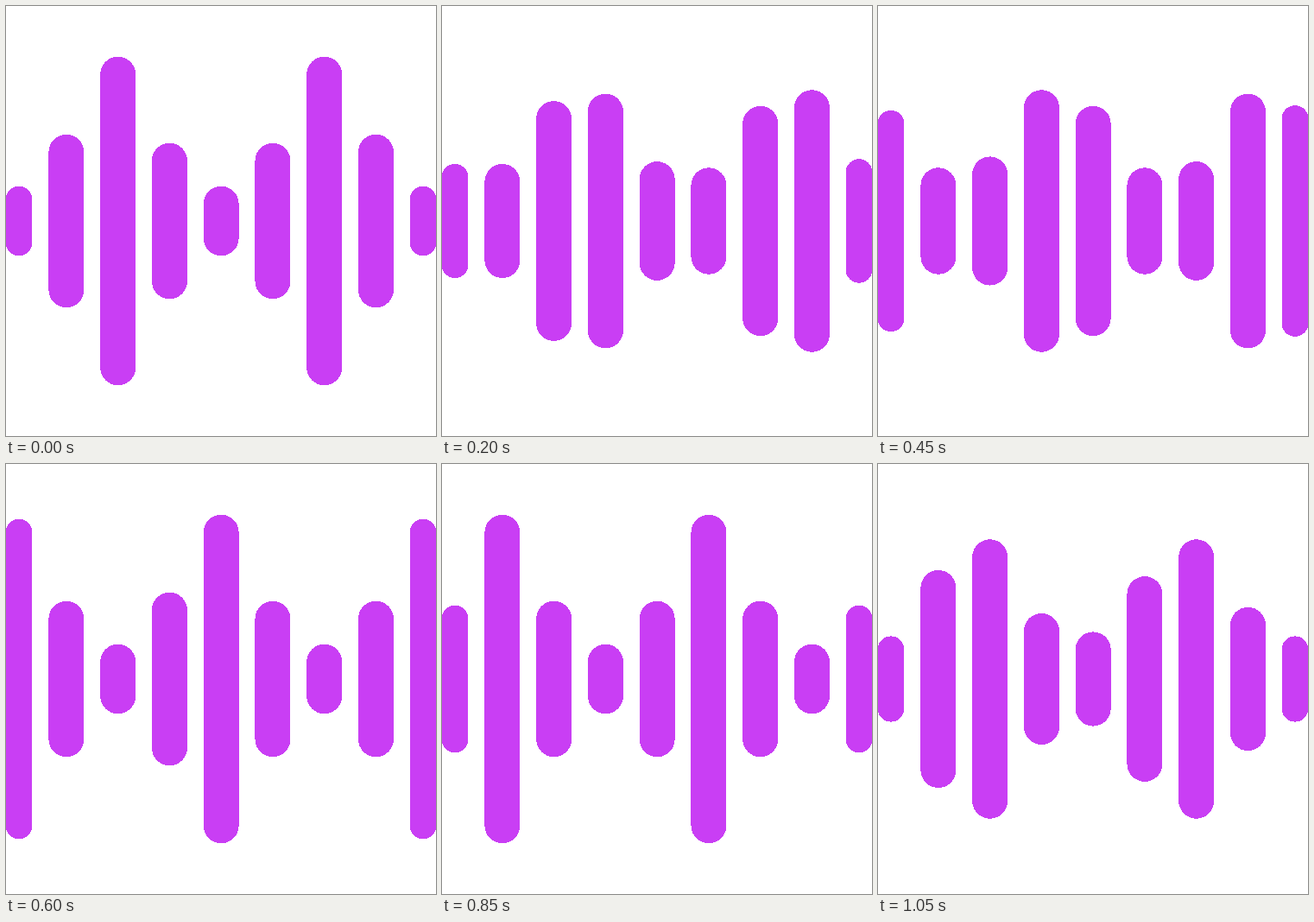
An HTML page that plays this animation: 498x498 px, repeating every 1.1 s.

```html
<!DOCTYPE html>
<html lang="en">
<head>
<meta charset="utf-8">
<title>Sound wave</title>
<style>
  html, body { margin: 0; width: 100%; height: 100%; overflow: hidden; background: #fff; }
  svg { display: block; width: 100vw; height: 100vh; }
</style>
</head>
<body>
<svg id="stage" viewBox="0 0 498 498" fill="#c93ef4" shape-rendering="crispEdges"></svg>
<script>
const LOOP = 1100, TICK = 50, STEPS = 7;
const SIZE = 498, COUNT = 9, PERIOD = 4;
const FIRST_X = 49.4, PITCH = 59.76, BAR = 41;
const EDGE = 30.8, EDGE_MIDDLE = 15;
const OUTLINE = 0.6;

const stage = document.getElementById('stage');
const isEdge = i => i === 0 || i === COUNT - 1;
const setAttrs = (el, attrs) => {
  for (const name in attrs) el.setAttribute(name, attrs[name]);
};

function makeBar(i) {
  const rect = document.createElementNS('http://www.w3.org/2000/svg', 'rect');
  const width = isEdge(i) ? EDGE : BAR;
  const edgeX = (i ? SIZE - EDGE_MIDDLE : EDGE_MIDDLE) - EDGE / 2;
  const x = isEdge(i) ? edgeX : FIRST_X + (i - 1) * PITCH;
  setAttrs(rect, { x, width, rx: width / 2, ry: width / 2 });
  return stage.appendChild(rect);
}

const bars = Array.from({ length: COUNT }, (_, i) => makeBar(i));

// A wave four bars long that moves one bar to the right with each pose.
function poseHeight(i, pose) {
  const turn = pose % PERIOD;
  const offset = i - turn;
  const phase = (offset + PERIOD) % PERIOD;
  const rise = Math.min(phase, PERIOD - phase);
  const wave = 80 + 50 * rise * (rise + 1);
  // The outer flanks stand a little higher until the last turn.
  const flank = turn < 3 && Math.abs(offset - PERIOD) === 3 ? 20 : 0;
  // Edge bars lose some height once the wave has set off.
  const loss = isEdge(i) && pose > 0 ? 10 : 0;
  return wave + flank - loss;
}

// After a slow start, every third tick advances two steps.
const stepAt = tick => tick + Math.max(0, Math.floor((tick - 4) / 3));

function render(time) {
  const step = stepAt(Math.floor((time % LOOP) / TICK));
  const pose = Math.floor(step / STEPS);
  const progress = (step % STEPS) / STEPS;
  bars.forEach((bar, i) => {
    const from = poseHeight(i, pose), to = poseHeight(i, pose + 1);
    const height = from + (to - from) * progress + OUTLINE;
    setAttrs(bar, { y: (SIZE - height) / 2, height });
  });
}

const start = performance.now();
function frame() {
  render(performance.now() - start);
  requestAnimationFrame(frame);
}
frame();
</script>
</body>
</html>
```
